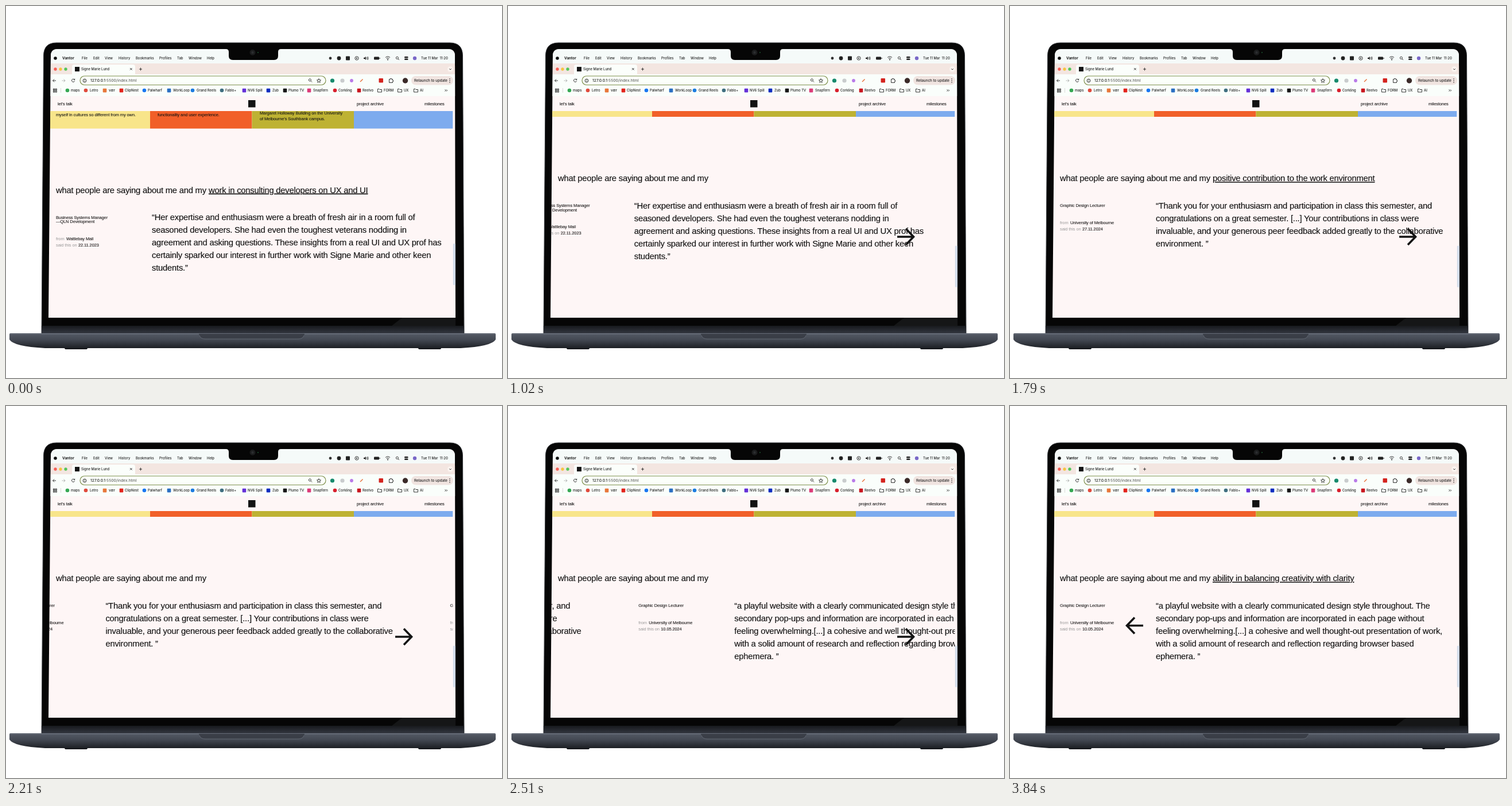
An HTML page for the animation above (3870 ms loop, 864 by 648 pixels).

```html
<!DOCTYPE html>
<html lang="en">
<head>
<meta charset="utf-8">
<title>Portfolio testimonials</title>
<style>
html, body { margin: 0; width: 100%; height: 100%; overflow: hidden; background: #fff; }
svg { display: block; width: 864px; height: 648px; }
text { white-space: pre; fill: #151515; }
.ui { font: 500 5.9px Inter, sans-serif; fill: #222; }
.sm { font: 7.45px "Liberation Sans", Arial, sans-serif; letter-spacing: -.09px; stroke: #151515; stroke-width: .08; }
.lg { font: 14.8px "Liberation Sans", Arial, sans-serif; letter-spacing: -.23px; stroke: #151515; stroke-width: .15; }
.dim { fill: #999; stroke: none; }
.line { fill: none; stroke: #222; stroke-width: .9; }
.url { font-size: 6.7px; }
.u { text-decoration: underline; text-decoration-thickness: 1px; text-underline-offset: 1.5px; }
</style>
</head>
<body>
<svg id="stage" viewBox="0 0 864 648"></svg>
<script>
const LOOP = 3870, STRIDE = 767, SLIDE_MS = 590;

const text = (x, y, s, cls = 'ui', extra = '') => `<text x="${x}" y="${y}" class="${cls}" ${extra}>${s}</text>`;
const rect = (x, y, w, h, fill, r = 0) => `<rect x="${x}" y="${y}" width="${w}" height="${h}" rx="${r}" fill="${fill}"/>`;
const dot = (x, y, r, fill) => `<circle cx="${x}" cy="${y}" r="${r}" fill="${fill}"/>`;
const path = (d, cls = 'line', extra = '') => `<path d="${d}" class="${cls}" ${extra}/>`;
const ring = (x, y, r) => `<circle cx="${x}" cy="${y}" r="${r}" class="line"/>`;
const lens = (x, y) => ring(x - .6, y - .6, 2) + path(`M${x + 1} ${y + 1}l2 2`);
const folder = x => path(`M${x - 3.5} 150v-5.5h2.5l1 1h3.5v4.5z`);

const slides = [
  { topic: 'work in consulting developers on UX and UI',
    role: ['Business Systems Manager', '—QLN Development'], from: 'Wattlebay Mail', date: '22.11.2023',
    quote: ['“Her expertise and enthusiasm were a breath of fresh air in a room full of',
      'seasoned developers. She had even the toughest veterans nodding in',
      'agreement and asking questions. These insights from a real UI and UX prof has',
      'certainly sparked our interest in further work with Signe Marie and other keen',
      'students.”'] },
  { topic: 'positive contribution to the work environment',
    role: ['Graphic Design Lecturer'], from: 'University of Melbourne', date: '27.11.2024',
    quote: ['“Thank you for your enthusiasm and participation in class this semester, and',
      'congratulations on a great semester. [...] Your contributions in class were',
      'invaluable, and your generous peer feedback added greatly to the collaborative',
      'environment. ”'] },
  { topic: 'ability in balancing creativity with clarity',
    role: ['Graphic Design Lecturer'], from: 'University of Melbourne', date: '10.05.2024',
    quote: ['“a playful website with a clearly communicated design style throughout. The',
      'secondary pop-ups and information are incorporated in each page without',
      'feeling overwhelming.[...] a cohesive and well thought-out presentation of work,',
      'with a solid amount of research and reflection regarding browser based',
      'ephemera. ”'] }
];

function slide(s, i) {
  const y = 392.5 + 7.5 * s.role.length;
  return `<g transform="translate(${i * STRIDE})">` +
    s.role.map((r, k) => text(87, 370.5 + 7.6 * k, r, 'sm')).join('') +
    text(87, y, 'from', 'sm dim') + text(105, y, s.from, 'sm') +
    text(87, y + 11, 'said this on', 'sm dim') + text(126, y + 11, s.date, 'sm') +
    s.quote.map((q, k) => text(254, 373 + 22 * k, q, 'lg')).join('') + '</g>';
}

function laptop() {
  return path('M62 571L65.5 86Q66 64 88 64H773Q795 64 795.5 86L798 571Z', '', 'fill="#060606" stroke="#3b3e42"') +
    path('M690 543H783V557H672Z', '', 'fill="#151617"') +
    rect(62, 557, 736, 14, 'url(#hinge)') +
    rect(102, 593, 40, 5, '#15171b', 2) + rect(718, 593, 40, 5, '#15171b', 2) +
    path('M6 572Q6 570 8 570H851Q853 570 853 572V581Q846 593 792 596H68Q13 593 6 581Z', '', 'fill="url(#base)"') +
    path('M7 571H852', '', 'stroke="#777d88"') +
    path('M336 571H520Q519 580 509 580H347Q337 580 336 571Z', '', 'fill="#3a3e47"') +
    path('M337 574Q339 580 347 580H509Q517 580 519 574', '', 'fill="none" stroke="#6b717d" stroke-width=".8"');
}

function menuBar() {
  const items = [[132, 'File'], [152, 'Edit'], [172, 'View'], [196, 'History'], [226, 'Bookmarks'],
    [267, 'Profiles'], [298, 'Tab'], [318, 'Window'], [350, 'Help']];
  return rect(70, 75, 720, 25, '#f5faf9') + dot(86, 91, 2.8, '#111') +
    text(98, 93.2, 'Vantor', 'ui', 'style="font-weight:700;font-size:6.4px"') +
    items.map(([x, s]) => text(x, 93.2, s)).join('') +
    dot(565, 91, 2.4, '#333') + dot(580, 91, 3.4, '#222') + rect(592, 87.5, 7, 7, '#222', 1) +
    ring(611, 91, 3.1) + path('M610 89.5v3l2.5-1.5z', '', 'fill="#222"') +
    path('M623 90h1.6l2.2-2v6l-2.2-2H623z', '', 'fill="#222"') + path('M628.3 89q1.4 2 0 4M630 88q2 3 0 6') +
    rect(641, 88.4, 9, 5.2, '#222', 1.3) + rect(650.6, 90, 1, 2, '#222') +
    path('M661 89.7q4-3.4 8 0M662.6 91.6q2.4-2 4.8 0') + dot(665, 93.4, 1, '#222') +
    lens(682, 91) + rect(694, 88, 6.5, 2.5, '#222', 1.2) + rect(694, 91.5, 6.5, 2.5, '#222', 1.2) +
    dot(712, 91, 3.2, '#7a68c8') + text(723, 93.2, 'Tue 11 Mar  11:20') +
    path('M383 75Q388 75 388 80V87Q388 94 395 94H467Q474 94 474 87V80Q474 75 479 75Z', '', 'fill="#060606"') +
    dot(429.5, 81, 5, '#1b1c1d') + dot(429.5, 81, 2.2, '#2b2d30') + dot(439, 81, .8, '#2d8a4d');
}

function toolbar() {
  const marks = [[107, 113, '#34a853', 'maps'], [139, 146, '#e04a3c', 'Letro'], [172, 179, '#e8773a', 'vær', 1],
    [201, 207, '#e3231b', 'ClipNest', 1], [241, 247, '#1877f2', 'Palwharf'], [284, 291, '#2a6fc2', 'WorkLoop', 1],
    [325, 332, '#1b7ce0', 'Grand Reels'], [376, 382, '#3f6f80', 'Fablo+'], [415, 421, '#6430d8', 'NV6 Spill', 1],
    [457, 464, '#0b2cc0', 'Zub', 1], [486, 492, '#151515', 'Plumo TV', 1], [528, 535, '#dc3a78', 'Snapfern', 1],
    [573, 579, '#d81f2c', 'Corkling'], [615, 621, '#c9151e', 'Reelvo', 1]];
  const grid = [0, 1, 2, 3].map(i =>
    `<rect x="${82.5 + i % 2 * 3.6}" y="${144.3 + (i >> 1) * 3.6}" width="2.2" height="2.2" class="line"/>`).join('');
  return rect(70, 100, 720, 19, '#f3e6e1') + rect(115, 102, 110, 20, '#fbfefb', 4) +
    dot(86, 110, 2.7, '#f45f56') + dot(95, 110, 2.7, '#f6c444') + dot(104, 110, 2.7, '#55c65a') +
    rect(120, 106, 8, 8, '#151515') + text(131, 112, 'Signe Marie Lund') +
    path('M216 108l3.6 3.6M219.6 108l-3.6 3.6M232 110h5M234.5 107.5v5') +
    dot(774, 110, 5, '#fbf3ef') + path('M772.3 109.3l1.7 1.7 1.7-1.7') +
    rect(70, 119, 720, 38, '#fafefb') +
    path('M87 130h-5.5m2.5-2.5l-2.5 2.5 2.5 2.5') +
    path('M97.5 130h5.5m-2.5-2.5l2.5 2.5-2.5 2.5', 'line', 'opacity=".35"') +
    path('M119.3 128.3a2.6 2.6 0 1 0 .3 2.3M119.7 126.7v2h-2') +
    '<rect x="129" y="122" width="428" height="15.5" rx="7.7" fill="#fbfffa" stroke="#80914f" stroke-width="1.2"/>' +
    ring(137, 130, 2.9) + path('M137 129.5v2M137 128v.8') +
    text(147, 132.2, '127.0.0.1<tspan fill="#666">:5500/index.html</tspan>', 'ui url') +
    lens(530, 129.5) +
    path('M545 126.6l1 2.3 2.5.2-1.9 1.7.6 2.4-2.2-1.3-2.2 1.3.6-2.4-1.9-1.7 2.5-.2z') +
    dot(568.5, 130, 3.6, '#168a6c') + dot(586, 130, 3.6, '#c9cccd') + dot(602, 130, 2.9, '#b87ae8') +
    path('M617 132l4.5-4.5', '', 'stroke="#e8703a" stroke-width="1.4"') +
    rect(649.5, 126, 7.5, 7.5, '#d4231e', 1) + path('M667.5 127.5h2v-1h2v1h2v2h1v2h-1v2h-6z') +
    dot(695.5, 130, 4.7, '#3a2a28') +
    rect(706, 122, 73, 15.5, '#f0e4e0', 7.7) + text(711, 132.2, 'Relaunch to update', 'ui', 'style="font-size:6.3px"') +
    [127, 130, 133].map(y => dot(773, y, .8, '#222')).join('') +
    grid + rect(95, 143, .7, 8, '#ccc') +
    marks.map(([ix, x, c, s, sq]) =>
      (sq ? rect(ix - 3.3, 143.8, 6.6, 6.6, c, 1) : dot(ix, 147, 3.3, c)) + text(x, 149.2, s)).join('') +
    [[651, 'FORM'], [686, 'UX'], [714, 'AI']].map(([x, s]) => folder(x) + text(x + 7, 149.2, s)).join('') +
    path('M764.5 145.5l1.6 1.6-1.6 1.6M767 145.5l1.6 1.6-1.6 1.6');
}

const blocks = [[77, 174, '#f8e58a'], [251, 177.5, '#f15f29'], [428.5, 177.5, '#beb233'], [606, 172.5, '#7dabee']];

document.getElementById('stage').innerHTML = `
<defs>
  <linearGradient id="hinge" x2="0" y2="1"><stop stop-color="#17191d"/><stop offset="1" stop-color="#343841"/></linearGradient>
  <linearGradient id="base" x2="0" y2="1"><stop stop-color="#555b66"/><stop offset=".45" stop-color="#434852"/><stop offset="1" stop-color="#1d2025"/></linearGradient>
  <clipPath id="screen"><path d="M74 543L78 87Q78 75 90 75H770Q782 75 782 87L783 543Z"/></clipPath>
  <clipPath id="view"><rect x="75" y="183" width="703.5" height="360"/></clipPath>
</defs>
${laptop()}
<g clip-path="url(#screen)">
  ${rect(70, 75, 720, 470, '#fef6f6')}
  ${menuBar()}${toolbar()}
  ${text(90, 172.8, "let's talk", 'sm')}${text(611, 172.8, 'project archive', 'sm')}${text(729, 172.8, 'milestones', 'sm')}
  ${rect(422, 164, 12.5, 12.5, '#131313')}
  <g clip-path="url(#view)">
    <g id="page">
      ${blocks.map(([x, w, c]) => rect(x, 150, w, 63.5, c)).join('')}
      ${text(87, 191.5, 'myself in cultures so different from my own.', 'sm')}
      ${text(264, 191.5, 'functionality and user experience.', 'sm')}
      ${text(442, 189, 'Margaret Holloway Building on the University', 'sm')}
      ${text(442, 199, 'of Melbourne’s Southbank campus.', 'sm')}
      ${text(87, 325.6, 'what people are saying about me and my', 'lg')}
      ${text(353, 325.6, '', 'lg u', 'id="topic"')}
      <g id="track">${slides.map(slide).join('')}</g>
    </g>
    <path id="arrow" d="M-14.5 0H13.5M.5-14L14 0L.5 14" fill="none" stroke="#141414" stroke-width="3.6"/>
  </g>
  <g id="bar">${rect(778.8, 414, 4.5, 72, '#d3ddeb', 1)}</g>
</g>`;

const $ = id => document.getElementById(id);
const clamp = p => p < 0 ? 0 : p > 1 ? 1 : p;
const sine = p => (1 - Math.cos(Math.PI * clamp(p))) / 2;
const cubic = p => (p = clamp(p)) < .5 ? 4 * p ** 3 : 1 - 4 * (1 - p) ** 3;
const move = (id, x, y, more = '') => $(id).setAttribute('transform', `translate(${x} ${y})${more}`);

// The first slide change is shown in held steps of 100 ms.
function firstSlide(t) {
  if (t < 1020) return 0;
  if (t >= 1590) return 1;
  const held = Math.min(1520, 1020 + Math.floor((t - 1020) / 100) * 100);
  return sine((held - 940) / SLIDE_MS);
}

function arrowAt(t) {
  const come = sine((t - 440) / 480), go = cubic((t - 3080) / 480);
  if (t < 3080) return [640 + 52.5 * come, 488 - 86 * come];
  return [692.5 - 475 * go, 403 - 20.5 * go * go];
}

function draw(t) {
  const scroll = t < 100 ? 0 : t < 230 ? 10 : 20.5;
  const pos = firstSlide(t) + sine((t - 2087) / SLIDE_MS);
  move('page', 0, -scroll);
  move('bar', 0, scroll / 5.5);
  move('track', -pos * STRIDE, 0);
  $('topic').textContent = Number.isInteger(pos) ? slides[pos].topic : '';
  $('arrow').style.display = t < 460 ? 'none' : '';
  move('arrow', ...arrowAt(t), pos === 2 ? ' scale(-1 1)' : '');
}

const start = performance.now();
function tick() {
  draw((performance.now() - start) % LOOP);
  requestAnimationFrame(tick);
}
tick();
</script>
</body>
</html>
```
